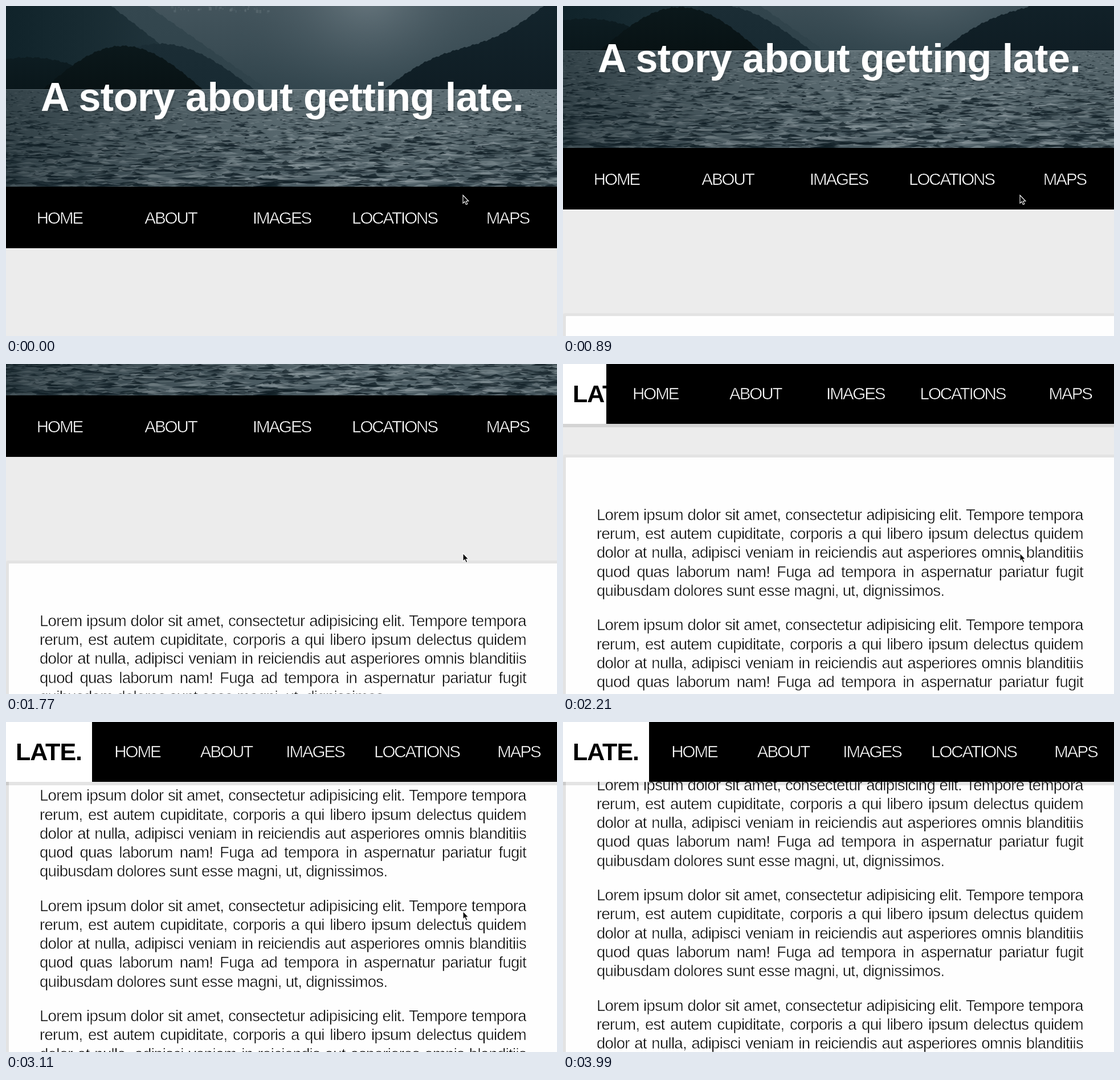
Write an HTML page with a canvas that moves like this. It is 967x579 px and loops after 4730 ms.

```html
<!DOCTYPE html>
<html lang="en">
<head>
<meta charset="utf-8">
<title>Sticky navigation</title>
<style>
  html, body { margin: 0; width: 100%; height: 100%; overflow: hidden; background: #ececec; }
  body { position: relative; font-family: "Liberation Sans", Arial, sans-serif; }
  #page { position: absolute; left: 0; top: 0; width: 967px; will-change: transform; }
  #photo { position: absolute; left: 0; top: 0; }
  h1 {
    position: absolute; left: 61px; top: 125px; margin: 0;
    font-size: 70px; line-height: 70px; letter-spacing: -.5px; white-space: nowrap;
    color: #fff; text-shadow: 3px 4px 0 rgba(0, 0, 0, .12);
  }
  #card {
    position: absolute; left: 5px; top: 612px; width: 980px; height: 1400px;
    background: #fefefe; border-radius: 1px; box-shadow: 0 0 1px 5px #e3e3e3;
  }
  #text { position: absolute; left: 54px; top: 84px; width: 854px; }
  p {
    margin: 0 0 27.4px; font-size: 27.5px; line-height: 33.2px; letter-spacing: -.68px;
    color: #000; -webkit-text-stroke: .6px #fefefe;
  }
  p span { display: block; white-space: nowrap; text-align: justify; text-align-last: justify; }
  p span:last-child { text-align-last: left; }
  nav {
    --open: 0;
    position: absolute; left: 0; top: 0; width: 967px; height: 108px;
    background: #000; will-change: transform;
  }
  nav.fixed { box-shadow: 0 6px 0 rgba(0, 0, 0, .1); }
  nav a {
    position: absolute; top: 0; left: calc(var(--from) + (var(--to) - var(--from)) * var(--open));
    transform: translateX(calc(1px - 50%)); white-space: nowrap;
    font-size: 29.5px; line-height: 110px; letter-spacing: -2.05px;
    color: #fff; -webkit-text-stroke: .6px #000;
  }
  #logo {
    position: absolute; left: 0; top: 0; width: calc(151px * var(--open)); height: 108px;
    overflow: hidden; background: #fff;
  }
  #logo b {
    display: block; width: 150px; text-align: center; color: #000;
    font-size: 43px; line-height: 110px; letter-spacing: -1px;
  }
  #cursor { position: absolute; left: 800px; top: 330px; }
</style>
</head>
<body>
<div id="page">
  <canvas id="photo" width="967" height="317"></canvas>
  <h1>A story about getting late.</h1>
  <div id="card"><div id="text"></div></div>
</div>
<nav id="nav">
  <div id="logo"><b>LATE.</b></div>
  <a style="--from: 93px; --to: 229.5px">HOME</a>
  <a style="--from: 288px; --to: 385.5px">ABOUT</a>
  <a style="--from: 483px; --to: 541.5px">IMAGES</a>
  <a style="--from: 681px; --to: 720px">LOCATIONS</a>
  <a style="--from: 879.5px; --to: 899px">MAPS</a>
</nav>
<svg id="cursor" width="14" height="22" viewBox="0 0 14 22">
  <path d="M2 2V16L5.2 13.2L7.4 18.4L9.8 17.4L7.6 12.3H11.8Z" fill="#000" stroke="#fff" stroke-width="1.1"/>
</svg>
<script>
const $ = id => document.getElementById(id);
const clamp = (v, lo, hi) => Math.max(lo, Math.min(hi, v));

const lines = [
  'Lorem ipsum dolor sit amet, consectetur adipisicing elit. Tempore tempora',
  'rerum, est autem cupiditate, corporis a qui libero ipsum delectus quidem',
  'dolor at nulla, adipisci veniam in reiciendis aut asperiores omnis blanditiis',
  'quod quas laborum nam! Fuga ad tempora in aspernatur pariatur fugit',
  'quibusdam dolores sunt esse magni, ut, dignissimos.'
];
$('text').innerHTML = ('<p>' + lines.map(l => `<span>${l}</span>`).join('') + '</p>').repeat(6);

// Lake scene
const W = 967, H = 317, HORIZON = 146;
const g = $('photo').getContext('2d');
let seed = 7;
const rnd = () => (seed = (seed * 16807) % 2147483647) / 2147483647;

function fade(gradient, ...colors) {
  colors.forEach((c, i) => gradient.addColorStop(i / (colors.length - 1), c));
  return gradient;
}
const down = (y0, y1, ...colors) => fade(g.createLinearGradient(0, y0, 0, y1), ...colors);
const across = (x0, x1, ...colors) => fade(g.createLinearGradient(x0, 0, x1, 0), ...colors);

// Height profiles above the waterline
const hump = (mid, half, height) => x =>
  height * Math.cos(Math.PI / 2 * clamp((x - mid) / half, -1, 1));
const slope = (top, steep) => x => HORIZON - (x - top) * steep;
const rightRidge = x => {
  const u = (x - 664) / 280;
  return u < 0 ? 0 : HORIZON * (u + .07 * Math.sin(2 * Math.PI * u));
};

function hill(fill, height) {
  g.fillStyle = fill;
  g.beginPath();
  g.moveTo(0, HORIZON);
  for (let x = 0; x <= W; x++) {
    const h = height(x);
    const trees = h > 2 ? Math.sin(x * .9) * .5 + Math.sin(x * .37) * .8 : 0;
    g.lineTo(x, HORIZON - Math.max(0, h + trees));
  }
  g.lineTo(W, HORIZON);
  g.fill();
}

function drawSky() {
  g.fillStyle = down(0, HORIZON, '#43545c', '#3b4d55', '#31444c');
  g.fillRect(0, 0, W, HORIZON);
  g.fillStyle = fade(g.createRadialGradient(635, -30, 10, 635, -30, 250),
    'rgba(126,140,147,.6)', 'rgba(96,112,120,.25)', 'rgba(60,78,86,0)');
  g.fillRect(0, 0, W, HORIZON);
  // Snow on the far slopes
  for (let i = 0; i < 60; i++) {
    g.fillStyle = `rgba(150,163,168,${rnd() * .22})`;
    g.fillRect(275 + rnd() * 185, rnd() * 12 - 4, 1 + rnd() * 4, 1 + rnd() * 5);
  }
}

function drawHills() {
  hill(down(0, HORIZON, '#34474f', '#2f424a'), slope(250, .7));
  hill(across(0, 290, '#10232a', '#182b32', '#22353d'), slope(185, .78));
  hill(down(66, HORIZON, '#1b2d35', '#182a32'), hump(270, 165, 80));
  hill(down(90, HORIZON, '#0d1c21', '#0a171b'), hump(40, 170, 56));
  hill(down(70, HORIZON, '#0b181b', '#081214'), hump(205, 140, 76));
  hill(down(0, HORIZON, '#13242c', '#0f1d24'), rightRidge);
}

// One ripple: a flat sliver with an off-centre crest
function ripple(x, y, len, h) {
  const peak = x + (rnd() - .5) * len * .6;
  g.beginPath();
  g.moveTo(x - len / 2, y + (rnd() - .3) * h);
  g.quadraticCurveTo(peak - len * .1, y - h, peak, y - h * (.3 + rnd()));
  g.quadraticCurveTo(peak + len * .1, y, x + len / 2, y + (rnd() - .2) * h);
  g.quadraticCurveTo(peak, y + h * .8, x - len / 2, y + h * .4);
  g.fill();
}

function drawSea() {
  g.fillStyle = down(HORIZON, H, '#5f6f75', '#5a6a70', '#4c5c63');
  g.fillRect(0, HORIZON, W, H - HORIZON);
  for (let i = 0; i < 5000; i++) {
    const near = Math.pow(rnd(), 1.3);
    const y = HORIZON + 2 + near * (H - HORIZON);
    const x = rnd() * (W + 80) - 40;
    const swell = .5 + .5 * Math.sin(x * .017 + y * .21 + 2 * Math.sin(x * .006 - y * .09));
    const dark = rnd() < .38 + .3 * swell;
    g.fillStyle = dark
      ? `rgba(18,32,39,${.35 + rnd() * .45})`
      : `rgba(140,153,158,${.25 + rnd() * .45})`;
    ripple(x, y, (5 + near * 40) * (.3 + rnd()), (.7 + near * 2.6) * (.4 + rnd()));
  }
  g.fillStyle = across(0, W, 'rgba(8,22,28,.5)', 'rgba(8,22,28,.22)', 'rgba(8,22,28,.04)', 'rgba(8,22,28,0)', 'rgba(8,22,28,.12)');
  g.fillRect(0, HORIZON, W, H - HORIZON);
  g.fillStyle = across(0, W, '#526168', '#8d999d', '#64737a');
  g.fillRect(0, HORIZON, W, 1);
}

drawSky();
drawHills();
drawSea();

const LOOP = 4730, HOLD = 730, TICK = 147.73, LAST = 23;
const NAV_TOP = 317, NAV_HEIGHT = 108, STICK = 320;
const keys = [[0, 0], [2, 68], [5, 188], [8, 262], [11, 340], [13, 426], [14, 467], [17, 669], [LAST, 881]];

// Speed at a key: the slope between its neighbours, at rest at both ends
function speed(i) {
  const a = keys[i - 1], b = keys[i + 1];
  return a && b ? (b[1] - a[1]) / (b[0] - a[0]) : 0;
}

function scrollAt(k) {
  const i = clamp(keys.findIndex(p => p[0] > k) - 1, 0, keys.length - 2);
  if (k >= LAST) return keys[keys.length - 1][1];
  const [k0, y0] = keys[i], [k1, y1] = keys[i + 1];
  const d = k1 - k0, u = (k - k0) / d, v = 1 - u;
  return y0 + (y1 - y0) * u * u * (3 - 2 * u) + d * u * v * (v * speed(i) - u * speed(i + 1));
}

const start = performance.now();

function draw() {
  const t = (performance.now() - start) % LOOP;
  const tick = clamp(Math.floor((t - HOLD) / TICK) + 1, 0, LAST);
  const y = Math.round(scrollAt(tick));
  const stuck = y >= STICK;
  // The bar leaves the flow when stuck, so the content jumps up by its height
  $('page').style.transform = `translateY(${-y - (stuck ? NAV_HEIGHT : 0)}px)`;
  $('nav').style.transform = `translateY(${stuck ? -3 : NAV_TOP - y}px)`;
  $('nav').style.setProperty('--open', clamp((y - STICK) / 40, 0, 1));
  $('nav').classList.toggle('fixed', stuck);
  $('cursor').style.display = tick < LAST ? '' : 'none';
  requestAnimationFrame(draw);
}
draw();
</script>
</body>
</html>
```
